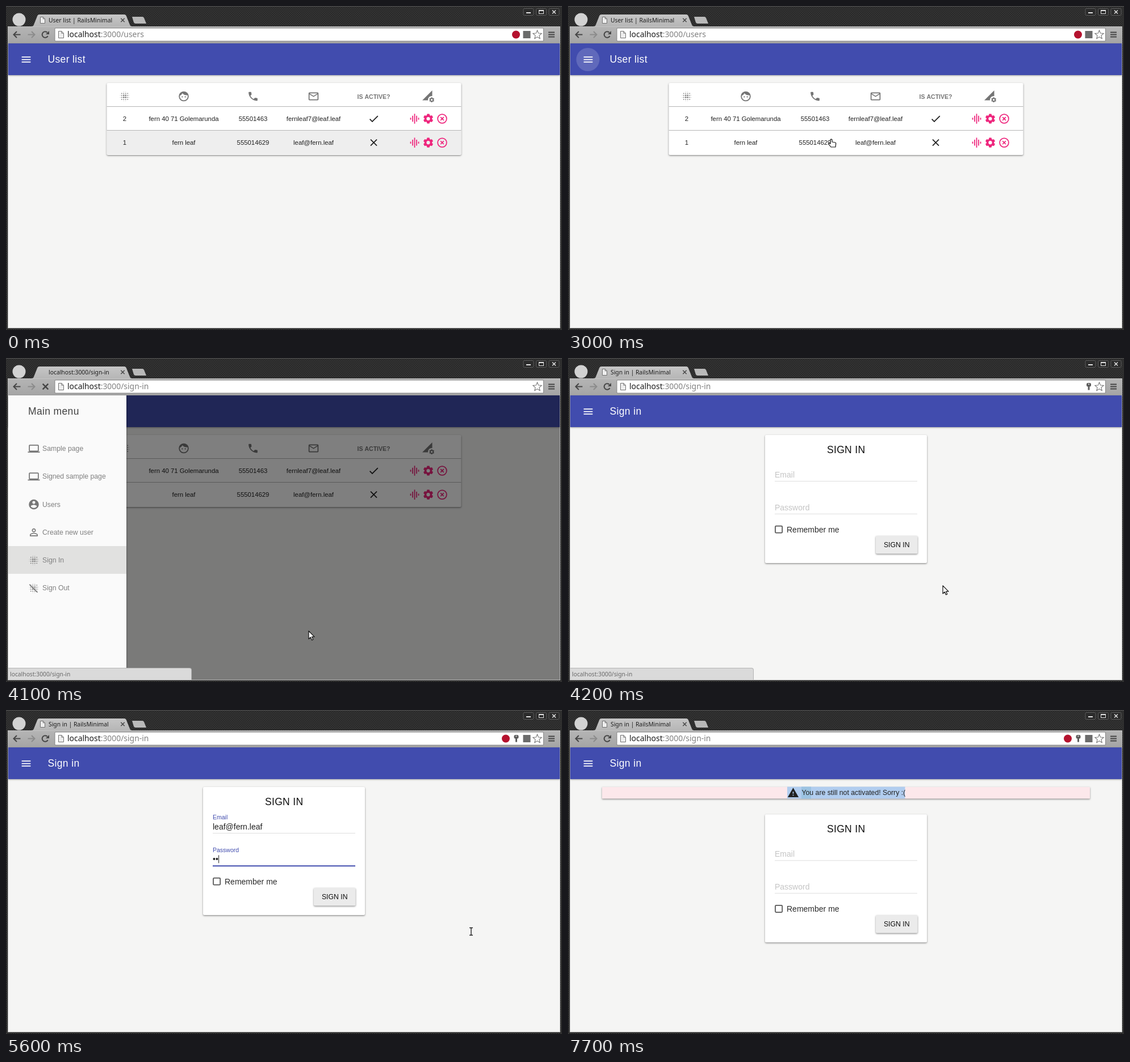
An HTML page with a canvas that plays this animation: 979 by 572 pixels, repeating every 8 s.

```html
<!DOCTYPE html>
<html lang="en">
<head>
<meta charset="utf-8">
<title>User list demo</title>
<style>
html, body { margin: 0; width: 100%; height: 100%; overflow: hidden; background: #2e2e2e; }
canvas { display: block; }
</style>
</head>
<body>
<canvas id="stage" width="979" height="572"></canvas>
<script>
const c = document.getElementById('stage').getContext('2d');
const LOOP = 8000, STEP = 100;
const UI = '"Noto Sans", "Open Sans", sans-serif';
const PAGE = '"Liberation Sans", Arial, sans-serif';
const INDIGO = '#414cae', PINK = '#ee267d', INK = '#212121', GREY = '#757575', SELECT = '#b1cdef';
// The pointer is shown displaced from the spot it acts on.
const SHIFT_X = 420, SHIFT_Y = 133;

const PATHS = {
  phone: 'M6.62 10.79c1.44 2.83 3.76 5.14 6.59 6.59l2.2-2.2c.27-.27.67-.36 1.02-.24 1.12.37 2.33.57 3.57.57.55 0 1 .45 1 1V20c0 .55-.45 1-1 1-9.39 0-17-7.61-17-17 0-.55.45-1 1-1h3.5c.55 0 1 .45 1 1 0 1.25.2 2.45.57 3.57.11.35.03.74-.25 1.02z',
  mail: 'M20 4H4c-1.1 0-2 .9-2 2v12c0 1.1.9 2 2 2h16c1.1 0 2-.9 2-2V6c0-1.1-.9-2-2-2zm0 14H4V8l8 5 8-5zm-8-7L4 6h16z',
  wave: 'M7 18h2V6H7zm4 4h2V2h-2zM3 14h2v-4H3zm12 4h2V6h-2zm4-8v4h2v-4z',
  check: 'M9 16.17L4.83 12l-1.42 1.41L9 19 21 7l-1.41-1.41z',
  signal: 'M19 11.5c.34 0 .67.03 1 .07V0L0 20h11.56c-.04-.33-.07-.66-.07-1 0-4.14 3.36-7.5 7.5-7.5z',
  laptop: 'M20 18c1.1 0 2-.9 2-2V6c0-1.1-.9-2-2-2H4c-1.1 0-2 .9-2 2v10c0 1.1.9 2 2 2H0v2h24v-2zM4 6h16v10H4z',
  account: 'M12 2a10 10 0 1 0 .01 0zM12 5a3 3 0 1 1-.01 0zm0 14.2c-2.5 0-4.71-1.28-6-3.22.03-1.99 4-3.08 6-3.08s5.97 1.09 6 3.08c-1.29 1.94-3.5 3.22-6 3.22z',
  person: 'M12 4a4 4 0 1 0 .01 0zm0 1.9a2.1 2.1 0 1 1-.01 0zM12 13c-2.67 0-8 1.34-8 4v3h16v-3c0-2.66-5.33-4-8-4zm0 1.9c2.97 0 6.1 1.46 6.1 2.1v1.1H5.9V17c0-.64 3.13-2.1 6.1-2.1z',
  warning: 'M1 21h22L12 2zm12-3h-2v-2h2zm0-4h-2v-4h2z',
  menu: 'M3 18h18v-2H3zm0-5h18v-2H3zm0-7v2h18V6z',
  arrow: 'M0 0V14l3.3-3 2.2 5 2.3-1-2.2-4.8H10z',
  hand: 'M0 1.2Q1.5-.8 3 1.2V5l5.5 1Q10 6.5 9.7 8L9 14H1L-3.3 8.5Q-3.5 6.5-1.8 7L0 8.2z',
  beam: 'M-3-6.5H3M-3 6.5H3M0-6.5V6.5'
};
for (const k in PATHS) PATHS[k] = new Path2D(PATHS[k]);

const POINTER = [
  [0, 1068, 374, 'beam'], [1200, 1068, 374, 'beam'], [1300, 937, 373, 'beam'], [1500, 928, 374, 'beam'],
  [1600, 928, 374, 'beam'], [1700, 984, 374, 'beam'], [1800, 997, 374, 'beam'], [2200, 997, 374, 'beam'],
  [2300, 990, 440, 'arrow'], [2400, 891, 446, 'arrow'], [2900, 455, 227, 'hand'], [3000, 462, 235, 'hand'],
  [3100, 517, 358, 'hand'], [3300, 519, 372, 'hand'], [3700, 533, 482, 'hand'], [4100, 533, 482, 'arrow'],
  [4200, 660, 402, 'arrow'], [4600, 820, 338, 'beam'], [5100, 820, 340, 'beam'], [5300, 819, 391, 'beam'],
  [5900, 819, 391, 'arrow'], [6200, 960, 445, 'arrow'], [6300, 998, 463, 'arrow'], [6900, 998, 463, 'arrow'],
  [7000, 962, 466, 'arrow'], [7300, 806, 282, 'beam'], [7400, 835, 284, 'beam'], [7500, 900, 287, 'beam'],
  [7600, 968, 288, 'beam'], [7700, 1030, 288, 'beam'], [8000, 1030, 288, 'beam']
];
const MENU = [['laptop', 'Sample page'], ['laptop', 'Signed sample page'], ['account', 'Users'],
  ['person', 'Create new user'], ['blur', 'Sign In'], ['blurOff', 'Sign Out']];
const ROWS = [['2', 'fern 40 71 Golemarunda', '55501463', 'fernleaf7@leaf.leaf'],
  ['1', 'fern leaf', '555014629', 'leaf@fern.leaf']];
const COLUMNS = [209, 313, 435, 541.5, 647.5];
const EMAIL = ROWS[1][3];

const clamp = (v, a, b) => Math.max(a, Math.min(b, v));
const between = (t, a, b) => t >= a && t < b;
const easeOut = p => 1 - (1 - clamp(p, 0, 1)) ** 3.6;

function rect(x, y, w, h, color) {
  c.fillStyle = color;
  c.fillRect(x, y, w, h);
}

function box(x, y, w, h, r, color) {
  c.fillStyle = color;
  c.beginPath();
  c.roundRect(x, y, w, h, r);
  c.fill();
}

function disc(x, y, r, color) {
  if (color) c.fillStyle = color;
  c.beginPath();
  c.arc(x, y, r, 0, 7);
  c.fill();
}

function line(color, width, ...pts) {
  c.strokeStyle = color;
  c.lineWidth = width;
  c.beginPath();
  pts.forEach(([x, y], i) => i ? c.lineTo(x, y) : c.moveTo(x, y));
  c.stroke();
}

function cross(x, y, r, color, width) {
  line(color, width, [x - r, y - r], [x + r, y + r]);
  line(color, width, [x + r, y - r], [x - r, y + r]);
}

function text(s, x, y, size, color, { align = 'left', font = PAGE, weight = 400, spacing = 0 } = {}) {
  c.font = `${weight} ${size}px ${font}`;
  c.textAlign = align;
  c.letterSpacing = spacing + 'px';
  c.fillStyle = color;
  c.fillText(s, x, y);
}

function raised(draw) {
  c.save();
  c.shadowColor = 'rgba(0,0,0,.45)';
  c.shadowBlur = 3;
  c.shadowOffsetY = 1.2;
  draw();
  c.restore();
}

function gear(x, y, r) {
  c.beginPath();
  for (let i = 0; i < 6; i++)
    for (const [d, k] of [[-25, .74], [-13, 1], [13, 1], [25, .74]]) {
      const a = (i * 60 - 90 + d) * Math.PI / 180;
      c.lineTo(x + Math.cos(a) * r * k, y + Math.sin(a) * r * k);
    }
  c.closePath();
  c.moveTo(x + r * .35, y);
  c.arc(x, y, r * .35, 0, 7);
  c.fill('evenodd');
}

function blur() {
  const at = [3, 6, 10, 14, 18, 21];
  at.forEach((x, i) => at.forEach((y, j) => {
    const ring = Math.max(Math.abs(i - 2.5), Math.abs(j - 2.5));
    const edge = Math.min(Math.abs(i - 2.5), Math.abs(j - 2.5));
    if (ring < 1) disc(x, y, 1.5);
    else if (ring < 2) disc(x, y, 1);
    else if (edge < 1) disc(x, y, .5);
  }));
}

// Icons live on a 24 unit grid.
const DRAWN = {
  blur,
  blurOff() {
    blur();
    line(c.fillStyle, 1.8, [3.1, 4.6], [19.4, 20.9]);
  },
  face() {
    c.lineWidth = 2;
    c.beginPath();
    c.arc(12, 12, 9, 0, 7);
    c.stroke();
    c.save();
    c.beginPath();
    c.arc(12, 12, 9.5, 0, 7);
    c.clip();
    c.beginPath();
    c.moveTo(2, 11.5);
    c.quadraticCurveTo(7.5, 10, 9.3, 5.8);
    c.quadraticCurveTo(13, 11, 22, 9.5);
    c.lineTo(20, 0);
    c.lineTo(2, 0);
    c.fill();
    c.restore();
    disc(9, 13, 1.25);
    disc(15, 13, 1.25);
  },
  gear() { gear(12, 12, 10.1); },
  setting() {
    c.fill(PATHS.signal);
    gear(19, 19, 5.2);
  },
  remove() {
    c.lineWidth = 2;
    c.beginPath();
    c.arc(12, 12, 9, 0, 7);
    c.stroke();
    cross(12, 12, 3.2, c.strokeStyle, 2);
  },
  close() { cross(12, 12, 6.3, c.strokeStyle, 2); }
};

function icon(name, x, y, color, size = 21) {
  c.save();
  c.translate(x - size / 2, y - size / 2);
  c.scale(size / 24, size / 24);
  c.fillStyle = c.strokeStyle = color;
  if (DRAWN[name]) DRAWN[name]();
  else c.fill(PATHS[name], 'evenodd');
  c.restore();
}

function weave() {
  const tile = document.createElement('canvas');
  tile.width = tile.height = 4;
  const g = tile.getContext('2d');
  g.fillStyle = '#343434';
  g.fillRect(0, 0, 4, 4);
  g.fillStyle = '#292929';
  g.fillRect(0, 0, 2, 2);
  g.fillRect(2, 2, 2, 2);
  return c.createPattern(tile, 'repeat');
}
const frameFill = weave();

function fade(y0, y1, a, b) {
  const g = c.createLinearGradient(0, y0, 0, y1);
  g.addColorStop(0, a);
  g.addColorStop(1, b);
  return g;
}

function sheet(x, y, w, h) {
  const f = w * .4;
  c.fillStyle = '#eee';
  c.strokeStyle = '#707070';
  c.lineWidth = 1;
  c.beginPath();
  c.moveTo(x, y);
  c.lineTo(x + w - f, y);
  c.lineTo(x + w, y + f);
  c.lineTo(x + w, y + h);
  c.lineTo(x, y + h);
  c.closePath();
  c.fill();
  c.stroke();
  line('#707070', 1, [x + w - f, y], [x + w - f, y + f], [x + w, y + f]);
}

function arrowIcon(x, dir, color) {
  line(color, 2, [x - 6 * dir, 50.5], [x + 5 * dir, 50.5]);
  line(color, 2, [x + .5 * dir, 45], [x + 6 * dir, 50.5], [x + .5 * dir, 56]);
}

function star(x, y) {
  c.beginPath();
  for (let i = 0; i < 10; i++) {
    const a = i * Math.PI / 5 - Math.PI / 2, r = i % 2 ? 3.6 : 8;
    c.lineTo(x + Math.cos(a) * r, y + Math.sin(a) * r);
  }
  c.closePath();
  c.strokeStyle = '#777';
  c.lineWidth = 1.1;
  c.stroke();
}

function keyIcon(x) {
  box(x - 4, 44, 8, 6.5, 2.5, '#5d5d5d');
  rect(x - 1.5, 50, 3, 6.5, '#5d5d5d');
  rect(x - 1, 45.5, 2, 1.5, '#eee');
}

function tabShape() {
  c.fillStyle = fade(15, 37, '#c6c6c6', '#b5b5b5');
  c.beginPath();
  c.moveTo(45, 36);
  c.quadraticCurveTo(48, 36, 49, 33);
  c.lineTo(55, 18);
  c.quadraticCurveTo(56, 15, 59, 15);
  c.lineTo(208, 15);
  c.quadraticCurveTo(211, 15, 212, 18);
  c.lineTo(218, 33);
  c.quadraticCurveTo(219, 36, 222, 36);
  c.fill();
  c.fillStyle = '#b9b9b9';
  c.beginPath();
  c.moveTo(222, 19);
  c.lineTo(240, 19);
  c.quadraticCurveTo(242, 19, 243, 21);
  c.lineTo(247, 31);
  c.lineTo(228, 31);
  c.quadraticCurveTo(226, 31, 225, 29);
  c.fill();
}

function chrome(t) {
  rect(0, 0, 979, 572, frameFill);
  rect(0, 0, 979, 1, '#555');
  rect(3, 36, 973, 533, '#b0b0b0');
  disc(23, 24, 11.5, '#d2d2d2');

  [920, 942.5, 965].forEach((x, i) => {
    c.fillStyle = '#2b2b2b';
    c.strokeStyle = '#5c5c5c';
    c.lineWidth = 1;
    c.beginPath();
    c.roundRect(x - 9, 4.5, 18, 12, 2);
    c.fill();
    c.stroke();
    if (i === 0) rect(x - 4, 11, 8, 2, '#e4e4e4');
    if (i === 1) {
      c.strokeStyle = '#e4e4e4';
      c.strokeRect(x - 4, 7.5, 8, 6);
      rect(x - 4, 7, 8, 2, '#e4e4e4');
    }
    if (i === 2) cross(x, 10.5, 3, '#e4e4e4', 1.5);
  });

  rect(3, 36, 973, 30, fade(36, 66, '#b5b5b5', '#a5a5a5'));
  rect(3, 36, 973, 1, '#c4c4c4');
  tabShape();

  const loading = between(t, 4100, 4200) || between(t, 6500, 6700);
  const path = t < 4100 ? '/users' : '/sign-in';
  const title = loading ? 'localhost:3000/sign-in' : (t < 4100 ? 'User list' : 'Sign in') + ' | RailsMinimal';
  if (!loading) sheet(60.5, 19.5, 8, 11);
  text(title, 75, 28.5, 10.35, '#1e1e1e', { font: UI });
  cross(205.5, 25, 3.2, '#484848', 1.5);

  arrowIcon(19.5, -1, '#454545');
  arrowIcon(44.5, 1, '#8b8b8b');
  if (loading) cross(69.5, 50.5, 4.8, '#454545', 2.4);
  else {
    c.strokeStyle = '#454545';
    c.lineWidth = 2;
    c.beginPath();
    c.arc(69, 50.5, 5.3, .5, 5.5);
    c.stroke();
    c.fillStyle = '#454545';
    c.beginPath();
    c.moveTo(76, 44);
    c.lineTo(76, 50);
    c.lineTo(70, 50);
    c.fill();
  }

  box(85.5, 38.5, 861.5, 24, 2, '#858585');
  box(86.5, 39.5, 859.5, 22, 1, '#fff');
  sheet(92.5, 44.5, 9, 12);
  text('localhost', 108, 55, 13.9, '#1a1a1a', { font: UI });
  text(':3000' + path, 108 + c.measureText('localhost').width, 55, 13.9, '#808080', { font: UI });

  const early = between(t, 4200, 4600) || between(t, 6700, 7000);
  if (early) keyIcon(917);
  else if (!loading) {
    disc(t < 4100 ? 898 : 880, 50.5, 7, '#b5122e');
    if (t >= 4200) keyIcon(898.5);
    rect(910.5, 44, 13, 13, '#6b6b6b');
  }
  star(935.5, 51);
  for (const y of [45.5, 49.5, 53.5]) rect(955, y, 11, 2, '#454545');
}

function pointerAt(t) {
  const i = POINTER.findLastIndex(k => k[0] <= t);
  const [t0, x0, y0, kind] = POINTER[i];
  const [t1, x1, y1] = POINTER[i + 1] || [LOOP, x0, y0];
  const p = (t - t0) / (t1 - t0 || 1);
  return { x: x0 + (x1 - x0) * p, y: y0 + (y1 - y0) * p, kind };
}

function drawPointer({ x, y, kind }) {
  if (x > 979) return;
  c.save();
  c.translate(x, y);
  c.lineJoin = 'round';
  if (kind === 'beam') {
    c.strokeStyle = '#fff';
    c.lineWidth = 3.2;
    c.stroke(PATHS.beam);
    c.strokeStyle = '#1c1c1c';
    c.lineWidth = 1.4;
  } else {
    c.fillStyle = '#fff';
    c.fill(PATHS[kind]);
    c.strokeStyle = '#111';
    c.lineWidth = 1.2;
  }
  c.stroke(PATHS[kind]);
  c.restore();
}

function appBar(title, t) {
  raised(() => rect(4, 66, 971, 56, INDIGO));
  if (between(t, 2900, 3100)) disc(35, 94.5, 20.5, 'rgba(255,255,255,.16)');
  icon('menu', 35.5, 94.5, '#fff');
  text(title, 73.5, 100, 17.5, '#fff', { spacing: .35 });
}

function table(t, mouse) {
  const x = mouse.x - SHIFT_X, y = mouse.y - SHIFT_Y;
  raised(() => box(177.5, 136, 624, 127, 2, '#fff'));
  ROWS.forEach((row, i) => {
    const top = 177 + i * 42, mid = 199 + i * 42.2;
    const over = t < 3000 && between(x, 178, 802) && between(y, top, top + 43);
    if (over) rect(177.5, top, 624, 43, '#eeeeee');
    rect(177.5, top, 624, 1, '#b5b5b5');
    if (i) {
      if (between(t, 300, 1300)) rect(637, 231, 21, 21, SELECT);
      if (between(t, 1600, 2900)) rect(506.5, 234, clamp(x - 506.5, 0, 70), 13, SELECT);
    }
    row.forEach((s, n) => text(s, COLUMNS[n], mid + 3.5, 11.375, INK, { align: 'center' }));
    icon(i ? 'close' : 'check', 647.5, mid, INK);
    icon('wave', 719.5, mid, PINK);
    icon('gear', 743.5, mid, PINK);
    icon('remove', 768, mid, PINK);
  });
  ['blur', 'face', 'phone', 'mail'].forEach((name, i) => icon(name, COLUMNS[i], 159.5, GREY));
  text('IS ACTIVE?', COLUMNS[4], 163.5, 10.5, GREY, { align: 'center', weight: 700 });
  icon('setting', 743.5, 159.5, GREY);
}

function drawer(t, mouse) {
  const open = easeOut((t - 3000) / 200);
  if (!open) return;
  rect(4, 66, 971, 502, `rgba(0,0,0,${open / 2})`);
  c.save();
  c.beginPath();
  c.rect(4, 66, 971, 502);
  c.clip();
  c.translate(Math.round(-208 * (1 - open)), 0);
  raised(() => rect(4, 60, 208, 515, '#fafafa'));
  text('Main menu', 39, 100, 17.5, '#424242', { spacing: .35 });
  MENU.forEach(([name, label], i) => {
    const top = 135.4 + i * 49.25;
    if (between(mouse.y - SHIFT_Y, top, top + 49.25)) rect(4, Math.round(top), 208, 49, '#e1e1e0');
    icon(name, 49, top + 24.6, '#777');
    text(label, 64, top + 28.8, 12.25, '#808080');
  });
  c.restore();
}

function field(label, value, y, lift, focused, caret) {
  const mix = (a, b) => Math.round(a + (b - a) * lift);
  const tint = `rgb(${mix(196, 65)},${mix(196, 76)},${mix(196, 174)})`;
  text(label, 364, y - 6.5 - 18 * lift, 14 - 3.5 * lift, tint);
  text(value, 364, y - 7, 14, INK);
  if (caret) rect(364 + c.measureText(value).width + .3, y - 19, 1, 14, INK);
  rect(364, y - .5, 251, 1, '#dedede');
  if (focused) rect(364, y - 1, 251, 2, INDIGO);
}

function alertBar(t, mouse) {
  raised(() => box(60, 136, 859, 20.5, 1, '#fce8eb'));
  if (t >= 7300) rect(386, 135.5, clamp(mouse.x - SHIFT_X - 386, 0, 207.5), 21, SELECT);
  if (t >= 7700) rect(411, 135.5, 17, 21, '#9cc3e2');
  icon('warning', 396.5, 146, INK);
  text('You are still not activated! Sorry :(', 411.5, 150, 12.25, INK);
}

function signIn(t, mouse) {
  const failed = t >= 6700;
  if (failed) alertBar(t, mouse);
  c.save();
  if (failed) c.translate(0, 48.3);
  raised(() => box(347, 136, 285, 226, 2, '#fff'));
  text('SIGN IN', 489.7, 168, 17.5, '#111', { align: 'center', spacing: .35 });
  const onEmail = !failed && between(t, 4700, 5300), onPassword = !failed && t >= 5300;
  const dots = failed ? 0 : clamp((t - 5500) / 50, 0, 8);
  field('Email', !failed && t >= 5000 ? EMAIL : '', 217.5, failed ? 0 : easeOut((t - 4600) / 200), onEmail, onEmail);
  field('Password', '•'.repeat(dots), 275.3, failed ? 0 : easeOut((t - 5200) / 200), onPassword, onPassword);
  c.strokeStyle = '#555';
  c.lineWidth = 1.75;
  c.beginPath();
  c.roundRect(365, 296.5, 12.2, 12.2, 1.5);
  c.stroke();
  text('Remember me', 385, 307.7, 14, '#2b2b2b');
  raised(() => box(542, 314, 73.5, 31.5, 2, between(t, 6300, 6700) ? '#d9d9d9' : '#ebebeb'));
  text('SIGN IN', 578.7, 333.5, 12.25, '#111', { align: 'center' });
  c.restore();
}

function statusBar() {
  box(4, 547, 323, 21, [0, 4, 0, 0], '#b4b4b4');
  box(4, 548, 322, 20, [0, 3, 0, 0], '#dadada');
  text('localhost:3000/sign-in', 7, 561.5, 10.3, '#686868', { font: UI });
}

function draw(t) {
  const mouse = pointerAt(t), users = t < 4200;
  chrome(t);
  rect(4, 66, 971, 502, '#f5f5f4');
  appBar(users ? 'User list' : 'Sign in', t);
  if (users) {
    table(t, mouse);
    drawer(t, mouse);
  } else signIn(t, mouse);
  if (between(t, 3800, 4500)) statusBar();
  drawPointer(mouse);
}

const start = performance.now();
function tick() {
  const t = (performance.now() - start) % LOOP;
  draw(Math.floor(t / STEP) * STEP);
  requestAnimationFrame(tick);
}
tick();
</script>
</body>
</html>
```
